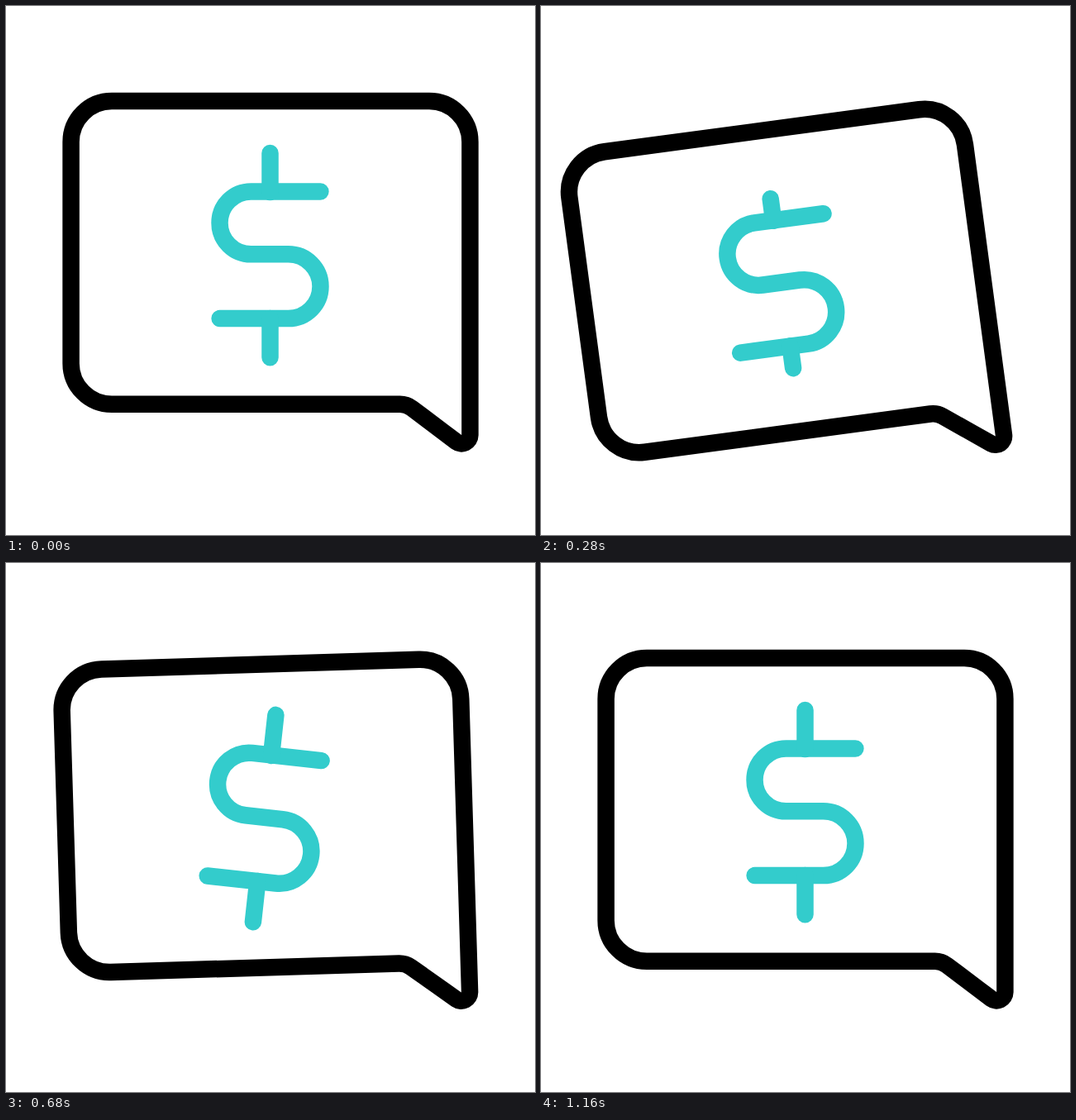
Write an HTML page that moves like this. It is 640 px wide and 640 px high and loops after 1.48 s.

```html
<!DOCTYPE html>
<html lang="en">
<head>
<meta charset="utf-8">
<title>Money message</title>
<style>
  html, body { margin: 0; width: 100%; height: 100%; overflow: hidden; background: #fff; }
  svg { display: block; width: 100%; height: 100%; }
  path { fill: none; stroke-width: 20.5; stroke-linecap: round; stroke-linejoin: round; }
</style>
</head>
<body>
<svg viewBox="0 0 640 640">
  <g id="bubble">
    <path stroke="#000" d="M128 115H512A49.4 49.4 0 0 1 561.4 164.4V519.2A10.3 10.3 0 0 1 544.9 527.3L491 486.6A24 24 0 0 0 476.6 481.8H128A49.4 49.4 0 0 1 78.6 432.4V164.4A49.4 49.4 0 0 1 128 115Z"/>
    <g id="dollar" stroke="#33cccc">
      <path d="M380.4 224.5H296.4a37.9 37.9 0 0 0 0 75.8H341.6a38.9 38.9 0 0 1 0 77.8H258.6"/>
      <path id="bars"/>
    </g>
  </g>
</svg>
<script>
const LOOP = 1480;
const FRAME = 40;

// Each track is a list of [time in ms, value].
const tilt = [[80, 0], [241, -10], [396, 5], [608, -3], [770, 0]];
const wobble = [[580, 0], [720, 10], [860, -10], [1000, 5], [1140, 0]];
const stretch = [[80, 0], [360, -25.2], [520, 2.8], [1160, 0]];

const [bubble, dollar, bars] = ['bubble', 'dollar', 'bars'].map(id => document.getElementById(id));

const ease = p => p * p * (3 - 2 * p);

function valueAt(track, time) {
  if (time <= track[0][0]) return track[0][1];
  for (let i = 1; i < track.length; i++) {
    const [t0, v0] = track[i - 1];
    const [t1, v1] = track[i];
    if (time < t1) return v0 + (v1 - v0) * ease((time - t0) / (t1 - t0));
  }
  return track[track.length - 1][1];
}

function draw(time) {
  const extra = valueAt(stretch, time);
  bubble.setAttribute('transform', `rotate(${valueAt(tilt, time)} 561.5 529.5)`);
  dollar.setAttribute('transform', `rotate(${valueAt(wobble, time)} 319.5 301.5)`);
  bars.setAttribute('d', `M319.5 225V${178 - extra}M319.5 378V${425.2 + extra}`);
}

const start = performance.now();

function tick() {
  const time = (performance.now() - start) % LOOP;
  draw(Math.floor(time / FRAME) * FRAME);
  requestAnimationFrame(tick);
}

tick();
</script>
</body>
</html>
```
